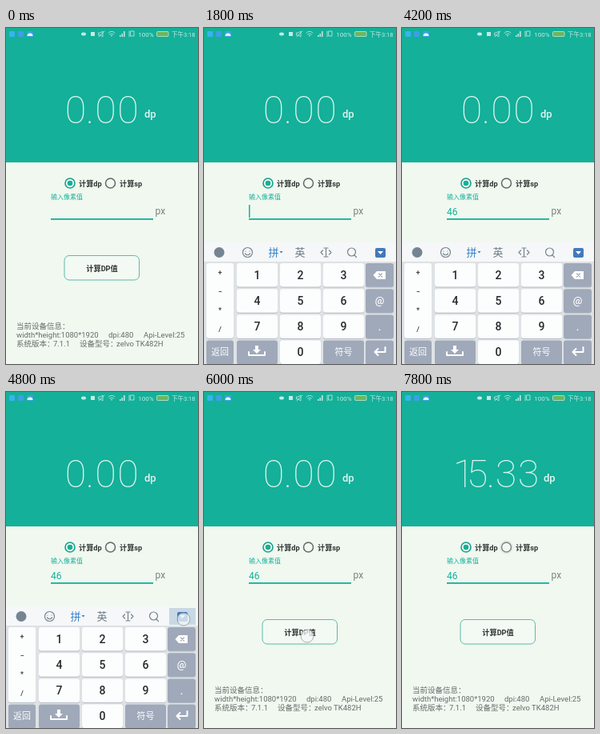
Write an HTML page that moves like this. It is 240 by 420 pixels and loops after 8 s.

```html
<!DOCTYPE html>
<html lang="zh">
<head>
<meta charset="utf-8">
<title>dp</title>
<style>
html, body { margin: 0; width: 100%; height: 100%; overflow: hidden; }
svg { display: block; width: 100vw; height: 100vh; background: #f0f8f0; font-family: Roboto, 'Noto Sans CJK SC', sans-serif; }
.teal { fill: #14b099; }
.bold { font: bold 9.2px Roboto, 'Noto Sans CJK SC', sans-serif; fill: #303633; }
.info { font-size: 9.5px; fill: #666c69; }
.mid { text-anchor: middle; }
.line { fill: none; stroke-width: 1.2; stroke-linecap: round; stroke-linejoin: round; }
#number { font-size: 48.5px; font-weight: 100; fill: #e2f5f1; }
#unit { font-size: 13px; font-weight: 500; fill: #e4f6f3; }
</style>
</head>
<body>
<svg viewBox="0 0 240 420">
  <rect class="teal" width="240" height="168"/>

  <g id="status" fill="#c4ebe4">
    <rect x="4" y="4" width="7" height="7" rx="1" fill="#35b4ee"/>
    <rect x="15" y="4" width="7" height="7" rx="1" fill="#3d9fe6"/>
    <rect x="26" y="4" width="8" height="7" rx="1" fill="#3d9fe6"/>
    <path d="M26.500 10a3.500 3.500 0 0 1 7 0z" fill="#e4f6f3"/>
    <ellipse cx="97" cy="7.500" rx="3" ry="2"/>
    <rect x="106" y="5" width="5" height="5"/>
    <path class="line" stroke="#c4ebe4" style="stroke-width:.8" d="M116 6h2l3-2v7l-3-2h-2zM116 11l7-7M128 6q4-3.500 8 0M129.500 8q2.500-2 5 0M154 4v7M156 4h4v6h-4z"/>
    <path d="M131 9h2l-1 2zM142 9h1.500v2H142zM144.500 7h1.500v4h-1.500zM147 4h1.500v7H147z"/>
    <text x="165.300" y="11" font-size="8">100%</text>
    <rect x="188.500" y="4.500" width="14.500" height="6" rx="1" fill="#6db65c" stroke="#c4e8d4" stroke-width=".8"/>
    <text x="207" y="11" font-size="7.500">下午3:18</text>
  </g>

  <text id="number" class="mid" y="118.500"></text>
  <text id="unit" y="111.500">dp</text>

  <circle class="line" cx="80" cy="194" r="6" stroke="#14a08d" style="stroke-width:1.600"/>
  <circle class="teal" cx="80" cy="194" r="3.300"/>
  <circle class="line" cx="130.500" cy="194" r="6" stroke="#626965" style="stroke-width:1.500"/>
  <text class="bold" x="91" y="197.500">计算dp</text>
  <text class="bold" x="142" y="197.500">计算sp</text>

  <text class="teal" x="56" y="214" font-size="8">输入像素值</text>
  <text id="input" class="teal" x="56" y="234" font-size="12"></text>
  <rect id="caret" class="teal" y="221" width="1.500" height="16"/>
  <rect class="teal" x="56" y="238" width="128" height="1.800"/>
  <text x="186.500" y="232.500" font-size="12" fill="#7a817d">px</text>

  <rect x="73" y="284.500" width="93.500" height="30.500" rx="6" fill="#f3f9f3" stroke="#5fb8aa"/>
  <text class="bold mid" x="120" y="303.500">计算DP值</text>

  <g class="info">
    <text x="13" y="376">当前设备信息：</text>
    <text x="13" y="387">width*height:1080*1920</text>
    <text x="128" y="387">dpi:480</text>
    <text x="172" y="387">Api-Level:25</text>
    <text x="13" y="398">系统版本：</text>
    <text x="59" y="398">7.1.1</text>
    <text x="92" y="398">设备型号：</text>
    <text x="138" y="398">zelvo TK482H</text>
  </g>

  <g id="keyboard">
    <rect y="268" width="240" height="152" fill="#dee2e5"/>
    <rect y="268" width="240" height="24" fill="#f5f7f8"/>
    <rect id="hideCell" x="204" y="270" width="33" height="21" fill="#c9d8e5"/>
    <circle cx="19" cy="280.500" r="6.500" fill="#758493"/>
    <g class="line" stroke="#75838f">
      <circle cx="54.500" cy="280.500" r="6"/>
      <path d="M52 279v.1M57 279v.1M51.500 282q3 3.500 6 0"/>
      <path d="M150 275h5M150 286h5M152.500 275v11M148.500 278l-2.500 2.500 2.500 2.500M156.500 278l2.500 2.500-2.500 2.500"/>
      <circle cx="184.500" cy="280" r="5"/>
      <path d="M188 284l2.500 2.500"/>
    </g>
    <text class="mid" x="87" y="285" font-size="13" fill="#347fc8">拼</text>
    <path d="M94.500 279h4l-2 2.500z" fill="#347fc8"/>
    <text class="mid" x="120" y="285" font-size="13" fill="#6b7985">英</text>
    <rect x="214" y="275" width="13" height="12" rx="2" fill="#4379bb"/>
    <path d="M217 279h7l-3.500 4z" fill="#fff"/>
    <g id="keys"></g>
    <path d="M211.500 309l4.500-5h11v10h-11z" fill="#fff"/>
    <path class="line" stroke="#9fa9b9" d="M218.500 307l4 4M222.500 307l-4 4"/>
    <g class="line" stroke="#fff" style="stroke-width:2">
      <path d="M56 405v4h20v-4"/>
      <path d="M226.500 399v6h-12M217.500 401l-4 4 4 4"/>
    </g>
    <path d="M64 397h4v5h3l-5 5-5-5h3z" fill="#fff"/>
  </g>

  <circle id="touch" r="8" fill="#f5f8f8" stroke="#8b9896"/>
</svg>
<script>
const STEP = 600, STEPS = 8000 / STEP;
const $ = id => document.getElementById(id);
const set = (id, attrs) => Object.entries(attrs).forEach(([k, v]) => $(id).setAttribute(k, v));
const show = (id, on) => $(id).style.display = on ? '' : 'none';

const DARK = '#9fa9b9';
const rowY = row => 294 + row * 32.2;
function key(x, row, w, label, dark, size = 14, h = 29.5) {
  const y = rowY(row);
  return `<rect x="${x}" y="${y + 1}" width="${w}" height="${h}" rx="3" fill="#b4bbc3"/>
    <rect x="${x}" y="${y}" width="${w}" height="${h}" rx="3" fill="${dark ? DARK : '#fcfdfd'}"/>
    <text class="mid" x="${x + w / 2}" y="${y + 14.5 + size * .36}" font-size="${size}" font-weight="500" fill="${dark ? '#fff' : '#25292d'}">${label}</text>`;
}

let keys = key(3, 0, 34, '', false, 10, 94);
['+', '−', '*', '/'].forEach((sign, i) =>
  keys += `<text class="mid" x="20" y="${309 + i * 23.5}" font-size="9" font-weight="500" fill="#333">${sign}</text>`);
for (let i = 0; i < 9; i++) keys += key(41 + i % 3 * 54, Math.floor(i / 3), 51, i + 1);
['', '@', '.', ''].forEach((label, row) => keys += key(202, row, 35, label, true, 13));
keys += key(3, 3, 34, '返回', true, 11) + key(41, 3, 51, '', true)
  + key(95, 3, 51, '0') + key(149, 3, 51, '符号', true, 11);
$('keys').innerHTML = keys;

// Touch position and opacity for each step that has one
const touches = {
  2: [134, 227, .8], 5: [80, 341, .75], 6: [174, 341, .75], 8: [222, 284, .75],
  9: [222, 284, .6], 10: [129, 305, .75], 11: [129, 305, .3], 13: [130.5, 194, .2]
};

function draw(step) {
  const done = step >= 11;
  $('number').textContent = done ? '15.33' : '0.00';
  set('number', { x: done ? '77 94 111 130 158' : '87 105 124.500 152.500' });
  set('unit', { x: done ? 177 : 173 });

  $('input').textContent = step < 5 ? '' : step < 6 ? '4' : '46';
  show('caret', step >= 2 && step <= 5);
  set('caret', { x: step < 5 ? 56 : 62.5 });

  const closing = step === 9;
  show('keyboard', step >= 3 && step <= 9);
  set('keyboard', { transform: `translate(0 ${closing ? 60 : 0})`, opacity: closing ? .45 : 1 });
  show('hideCell', step === 8);

  const touch = touches[step];
  show('touch', touch);
  if (touch) set('touch', { cx: touch[0], cy: touch[1], opacity: touch[2] });
}

function tick() {
  draw(Math.floor(performance.now() / STEP % STEPS));
  requestAnimationFrame(tick);
}
tick();
</script>
</body>
</html>
```
